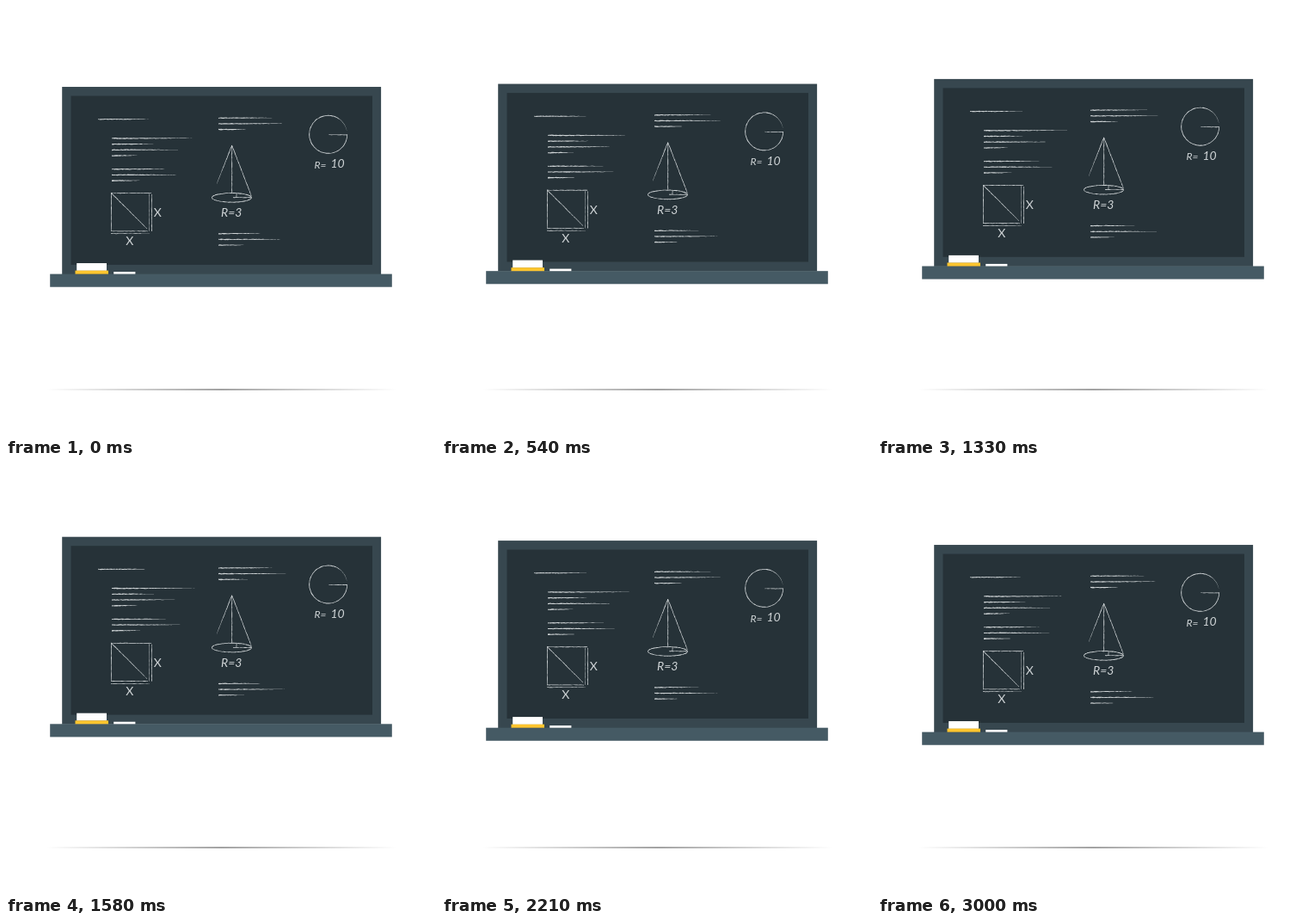
Animation, 500 px wide and 500 px high, one loop 3040 ms. Source, as an HTML page:

```html
<!DOCTYPE html>
<html lang="en">
<head>
<meta charset="utf-8">
<title>Floating blackboard</title>
<style>
  html, body { margin: 0; width: 100%; height: 100%; overflow: hidden; background: #fff; }
  svg { display: block; width: 100vw; height: 100vh; }
  text { font: 14px Lato, "Open Sans", sans-serif; }
  .slant { font-style: italic; }
</style>
</head>
<body>
<svg viewBox="0 0 500 500">
  <defs>
    <linearGradient id="ground">
      <stop offset="0" stop-color="#666" stop-opacity="0"/>
      <stop offset=".5" stop-color="#666"/>
      <stop offset="1" stop-color="#666" stop-opacity="0"/>
    </linearGradient>
  </defs>
  <rect x="47" y="445.4" width="407" height="1.2" fill="url(#ground)"/>
  <g id="board">
    <rect x="65.2" y="94" width="370.9" height="218" fill="#37474f"/>
    <rect x="75.5" y="104.5" width="350.5" height="196.4" fill="#263238"/>
    <rect x="51.2" y="311.6" width="397.6" height="15.1" fill="#455a64"/>
    <rect x="82.2" y="299" width="34.8" height="8.8" fill="#fff"/>
    <rect x="80.5" y="307.6" width="38.5" height="4" fill="#fec52e"/>
    <rect x="125.2" y="309" width="25.2" height="2.6" fill="#fff"/>
    <g fill="#cfd4d6">
      <path id="chalk"/>
      <text x="171.7" y="245">X</text>
      <text x="139.2" y="278">X</text>
      <text x="250" y="245" class="slant">R=3</text>
      <text x="358.5" y="188.5" class="slant" style="font-size:12px">R=</text>
      <text x="377.5" y="188" class="slant">10</text>
    </g>
  </g>
</svg>
<script>
const LOOP = 3040;
const board = document.getElementById('board');
let seed = 11, strokes = '';

function random() {
  seed = (seed * 16807) % 2147483647;
  return seed / 2147483647;
}

// Rough-edged stroke along point(u), u from 0 to 1
function chalk(point, length, width, taper = 0) {
  const steps = Math.ceil(length / 1.6), left = [], right = [];
  for (let i = 0; i <= steps; i++) {
    const u = i / steps, [x, y] = point(u);
    const [ax, ay] = point(u - .001), [bx, by] = point(u + .001);
    const d = Math.hypot(bx - ax, by - ay);
    const nx = (ay - by) / d, ny = (bx - ax) / d;
    const half = width * (1 - taper * u * u) / 2;
    const a = half * (.5 + random()), b = half * (.5 + random());
    left.push([x + nx * a, y + ny * a]);
    right.unshift([x - nx * b, y - ny * b]);
  }
  strokes += 'M' + [...left, ...right].map(p => p.map(v => v.toFixed(2))).join('L') + 'Z';
}

function line(x1, y1, x2, y2, width = .7, taper = 0) {
  chalk(u => [x1 + (x2 - x1) * u, y1 + (y2 - y1) * u],
    Math.hypot(x2 - x1, y2 - y1), width, taper);
}

function arc(cx, cy, rx, ry, from, sweep, width, taper) {
  chalk(u => {
    const a = from + sweep * u;
    return [cx + rx * Math.cos(a), cy + ry * Math.sin(a)];
  }, rx * Math.abs(sweep), width, taper);
}

function rows(x, y, ...ends) {
  ends.forEach((end, i) => line(x, y + i * 6.7, end, y + i * 6.7 - .2, 1.15, .95));
}

rows(107, 131.7, 168);
rows(123, 153.9, 220, 172, 200, 153);
rows(123, 189.7, 188, 203, 156);
rows(247, 130.2, 313, 326, 281);
rows(247, 264.7, 299, 324, 277);

// Square
line(122.5, 217, 122.5, 262);
line(122, 217.6, 169, 217.6);
line(166.4, 217, 166.4, 262, .4);
line(169.4, 219, 169.4, 262);
line(122, 261.8, 165, 261.8);
line(122, 264.6, 167, 264.6, .7, .6);
line(123, 218, 164, 259, .8, .5);

// Cone
line(262.7, 162, 245, 207, .8, .7);
line(262.7, 162, 285.4, 221);
line(262.7, 162, 262.7, 217);
arc(262.5, 222.8, 23, 5.3, 0, Math.PI * 2, .8);
line(262, 217.6, 268, 217.6);
line(268, 217.6, 268, 222.5);
line(264, 222.7, 285, 222.7);

// Circle
arc(374.7, 149.3, 22, 22, 0, 5.3, .8);
arc(374.7, 149.3, 22, 22, 5.3, .8, .5, .8);
line(375.5, 149.8, 397, 149.8);

document.getElementById('chalk').setAttribute('d', strokes);

function frame(now) {
  const a = ((now + 40) % LOOP) / LOOP * Math.PI * 2;
  const y = -4.7 + 4.4 * (Math.cos(a) + .08 * Math.cos(3 * a));
  board.setAttribute('transform', `translate(0 ${y.toFixed(3)})`);
  requestAnimationFrame(frame);
}
frame(performance.now());
</script>
</body>
</html>
```
